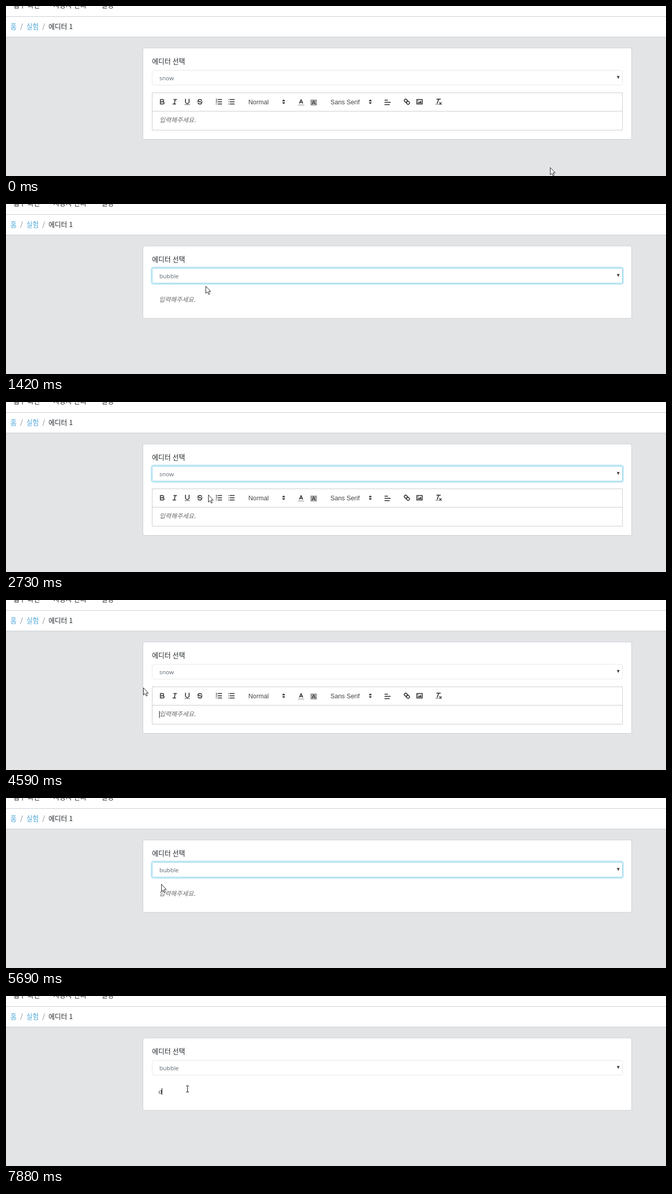
Write an HTML page that moves like this. It is 1280 px wide and 332 px high and loops after 8 s.

```html
<!DOCTYPE html>
<html lang="ko">
<head>
<meta charset="utf-8">
<title>에디터</title>
<style>
html, body { margin: 0; width: 100%; height: 100%; overflow: hidden; background: #e3e4e6; }
svg { display: block; }
#stage { width: 100%; height: 100%; }
text { white-space: pre; font-family: "Noto Sans CJK KR", "Noto Sans CJK", "Noto Sans", sans-serif; font-size: 13.1px; fill: #23282c; }
.latin { font-family: "Open Sans", "Noto Sans", sans-serif; font-size: 11.45px; fill: #5c6873; }
.pick { font-family: "Liberation Sans", Arial, sans-serif; font-size: 12.25px; fill: #444; }
.hint { font-size: 12.2px; font-style: italic; fill: #6b6b6b; }
.link { fill: #4fa8da; }
.edge { fill: none; stroke: #ccc; }
.icon { fill: none; stroke: #3c3c3c; stroke-width: 2; stroke-linecap: round; stroke-linejoin: round; }
.thin { stroke-width: 1; }
.solid { fill: #3c3c3c; }
.flat { fill: #3c3c3c; stroke: none; }
.caret { stroke: #111; }
</style>
</head>
<body>
<svg id="stage" viewBox="0 0 1280 332" preserveAspectRatio="none">
  <defs>
    <pattern id="hatch" width="2.3" height="2.3" patternUnits="userSpaceOnUse" patternTransform="rotate(45)">
      <rect width="1.2" height="2.3" fill="#3c3c3c"/>
    </pattern>
  </defs>

  <rect width="1280" height="60" fill="#fff"/>
  <path d="M0 20.5H1280M0 60.5H1280" stroke="#c8ced3"/>
  <text x="14" y="2.5">업무 화면</text>
  <text x="92" y="2.5">사용자 관리</text>
  <text x="185" y="2.5">설정</text>
  <text x="8.5" y="45" class="link">홈</text>
  <text x="27.5" y="45" style="fill:#73818f">/</text>
  <text x="39.5" y="45" class="link">실험</text>
  <text x="70.5" y="45" style="fill:#73818f">/</text>
  <text x="82.5" y="45">에디터 1</text>

  <rect id="card" x="265.5" y="82" width="948" height="178.5" rx="3" fill="#fff" stroke="#c8ced3"/>
  <text x="283.3" y="113">에디터 선택</text>

  <rect id="ring" x="282.1" y="123.6" width="914.8" height="32.8" rx="4" fill="none" stroke="#c7e9f5" stroke-width="2.8"/>
  <rect id="box" x="283.5" y="125.5" width="912" height="29" rx="3" fill="#fff"/>
  <text id="value" class="latin" x="297.6" y="144.6"></text>
  <path d="M1184.6 136.8h5.6l-2.8 5.6z" fill="#444"/>

  <g id="snow">
    <path class="edge" d="M283.5 169.5H1195.5V242.5H283.5ZM283.5 205.5H1195.5"/>
    <g id="tools"></g>
    <text class="pick" x="470" y="191.6">Normal</text>
    <text class="pick" x="629.3" y="191.6">Sans Serif</text>
    <text class="hint" x="297.5" y="227">입력해주세요.</text>
    <path class="caret" id="snowCaret" d="M297.5 217V230"/>
  </g>
  <g id="bubble">
    <text class="hint" id="bubbleHint" x="296.7" y="190.7">입력해주세요.</text>
    <text class="latin" id="typed" x="295.8" y="190.8" style="fill:#222">d</text>
    <path class="caret" id="bubbleCaret" d="M0 180V193"/>
  </g>

  <g id="menu">
    <rect x="283.5" y="155.5" width="913" height="36" fill="#fff" stroke="#86a3d8"/>
    <rect id="mark" x="284" width="912.5" height="18" fill="#3e90ff"/>
    <text class="latin" id="optBubble" x="297.6" y="169">bubble</text>
    <text class="latin" id="optSnow" x="297.6" y="186.6">snow</text>
  </g>

  <path id="arrow" d="M.5.5V14.6L3.7 11.6L6 16.6L8.1 15.7L5.9 10.8H10.1Z" fill="#fff" stroke="#222"/>
  <path id="beam" d="M-3 -6H-1L0 -5.3L1 -6H3M0 -5.5V5.5M-3 6H-1L0 5.3L1 6H3" fill="none" stroke="#222" stroke-width="1.2"/>
</svg>
<script>
const LOOP = 8000;
const $ = id => document.getElementById(id);
const path = (d, cls = "") => `<path class="${cls}" d="${d}"/>`;
const letterA = path("M5.5 11L9 3L12.5 11M11.6 9H6.4");
const sorter = path("M7 11L9 13L11 11ZM7 7L9 5L11 7Z", "solid");

// Toolbar icons: centre x, centre y, drawing on an 18-unit grid
const icons = [
  [303, 187, path("M5 4H9.5A2.5 2.5 0 0 1 9.5 9H5ZM5 9H10.5A2.5 2.5 0 0 1 10.5 14H5Z")],
  [327.3, 187, path("M7 4H13M5 14H11M8 14L10 4")],
  [351.6, 187, path("M5 3V9A4 4 0 0 0 13 9V3") + path("M3 15h12v1h-12z", "flat")],
  [376, 187, path("M12.9 6C12 3 5 3.2 5 6.5C5 8 6.5 8.7 9 9C11.5 9.3 13 10 13 11.5C13 14.8 6 15 5.1 12") + path("M2.5 9H15.5", "thin")],
  [413, 187, path("M7 4H15M7 9H15M7 14H15") + path("M2.5 5.5H4.5M2.5 3L3.5 2.5V5.5M4.5 10.5H2.5C2.5 10 4.3 9.4 4.3 8.2A1 1 0 0 0 2.5 8.1M2.5 14.8A1 1 0 0 0 3.7 14A1 1 0 0 0 2.5 13.1", "thin")],
  [437.3, 187, path("M6 4H15M6 9H15M6 14H15M3 4H3M3 9H3M3 14H3")],
  [538.5, 187, sorter],
  [572.3, 188, letterA + `<path d="M3 15H15" opacity=".4"/>`],
  [596.7, 188, `<path d="M2 3H16V16H2Z" fill="url(#hatch)" stroke="none"/><path d="M5.5 12L9 5L12.5 12Z" fill="#fff" stroke="#fff" stroke-width="3"/>` + path("M5.5 13L9 5L12.5 13M11.6 11H6.4")],
  [706.5, 187, sorter],
  [740, 188.2, path("M3 4H9M3 9H15M3 14H13")],
  [777.5, 187, path("M7 11L11 7M8.9 4.6A3.5 3.5 0 0 1 9.3 9.3A3.5 3.5 0 0 1 4.6 8.9C3.2 7.5 2 6.4 4.2 4.2S7.5 3.2 8.9 4.6ZM13.4 9.1A3.5 3.5 0 0 0 8.7 8.7A3.5 3.5 0 0 0 9.1 13.4C10.5 14.8 11.6 16 13.8 13.8S14.8 10.5 13.4 9.1Z")],
  [802, 187, path("M3 4H15V14H3Z") + path("M5 12V11L7 9L8 10L11 7L13 9V12ZM5 7a1 1 0 0 1 2 0a1 1 0 0 1 -2 0Z", "flat")],
  [839, 187, path("M5 3H13M6 12L9.4 3M11 11L15 15M15 11L11 15") + path("M2 14h7v1h-7z", "flat")]
];
$("tools").innerHTML = icons.map(([x, y, art]) =>
  `<g class="icon" transform="translate(${x} ${y}) scale(.875) translate(-9 -9)">${art}</g>`).join("");

// Start time, pointer x, pointer y, flags:
// b bubble theme, f focused select, o open menu, u upper option marked,
// c caret, i text pointer, d letter typed
const steps = [
  [0, 1055, 315, ""], [100, 960, 285, ""], [210, 690, 216, ""], [320, 450, 156, ""], [430, 386, 135, ""],
  [650, 386, 136, "fo"], [760, 388, 142, "fo"], [870, 389, 149, "fo"], [980, 388, 156, "fou"], [1090, 387, 160, "fou"],
  [1310, 387, 160, "bf"], [1530, 386, 163, "bf"], [1640, 386, 160, "bf"], [1750, 387, 154, "bf"],
  [1850, 388, 147, "bf"], [1960, 389, 141, "bf"], [2060, 389, 137, "bf"],
  [2180, 389, 137, "bfou"], [2290, 389, 146, "bfou"], [2400, 390, 160, "bfou"], [2510, 391, 175, "bfo"],
  [2620, 392, 181, "f"], [2840, 393, 185, "f"], [2950, 398, 196, "f"],
  [3060, 408, 212, "fi"], [3170, 416, 224, "fi"], [3280, 420, 230, "fi"], [3390, 421, 231, "ci"], [3500, 421, 231, "ci"],
  [3920, 390, 228, "i"], [4030, 300, 219, "i"], [4140, 170, 206, ""], [4260, 88, 194, ""],
  [4370, 120, 186, ""], [4480, 205, 178, "c"], [4590, 266, 171, "c"], [4700, 298, 146, "c"],
  [4800, 301, 142, "fo"], [5020, 301, 146, "fo"], [5130, 301, 151, "fo"], [5240, 301, 157, "fou"],
  [5350, 301, 163, "fou"], [5460, 301, 167, "fou"],
  [5690, 301, 168, "bf"], [5800, 308, 172, "bf"], [5910, 332, 184, "bfi"], [6020, 348, 188, "bfi"],
  [6140, 352, 188, "bfi"], [6250, 352, 188, "bci"],
  [6560, 352, 181.5, "bci"], [6780, 352, 181.5, "bi"], [7340, 352, 181.5, "bci"],
  [7770, 352, 181.5, "bdi"], [7880, 352, 181.5, "bdci"]
];

const show = (id, on) => $(id).style.display = on ? "" : "none";

function draw(time) {
  const [, x, y, flags] = steps.findLast(step => step[0] <= time);
  const has = flag => flags.includes(flag);
  const bubble = has("b"), focus = has("f"), upper = has("u"), typed = has("d");

  $("card").setAttribute("height", bubble ? 141.3 : 178.5);
  $("box").setAttribute("stroke", focus ? "#8ad4ee" : "#e4e7ea");
  $("value").textContent = bubble ? "bubble" : "snow";
  show("ring", focus);
  show("snow", !bubble);
  show("bubble", bubble);
  show("snowCaret", has("c"));
  show("bubbleCaret", has("c"));
  show("bubbleHint", !typed);
  show("typed", typed);
  $("bubbleCaret").setAttribute("transform", `translate(${typed ? 302.5 : 296.5})`);

  show("menu", has("o"));
  $("mark").setAttribute("y", upper ? 156 : 173.5);
  $("optBubble").style.fill = upper ? "#fff" : "";
  $("optSnow").style.fill = upper ? "" : "#fff";

  show("arrow", !has("i"));
  show("beam", has("i"));
  $(has("i") ? "beam" : "arrow").setAttribute("transform", `translate(${x} ${y})`);
}

const start = performance.now();
function tick() {
  draw((performance.now() - start) % LOOP);
  requestAnimationFrame(tick);
}
tick();
</script>
</body>
</html>
```
